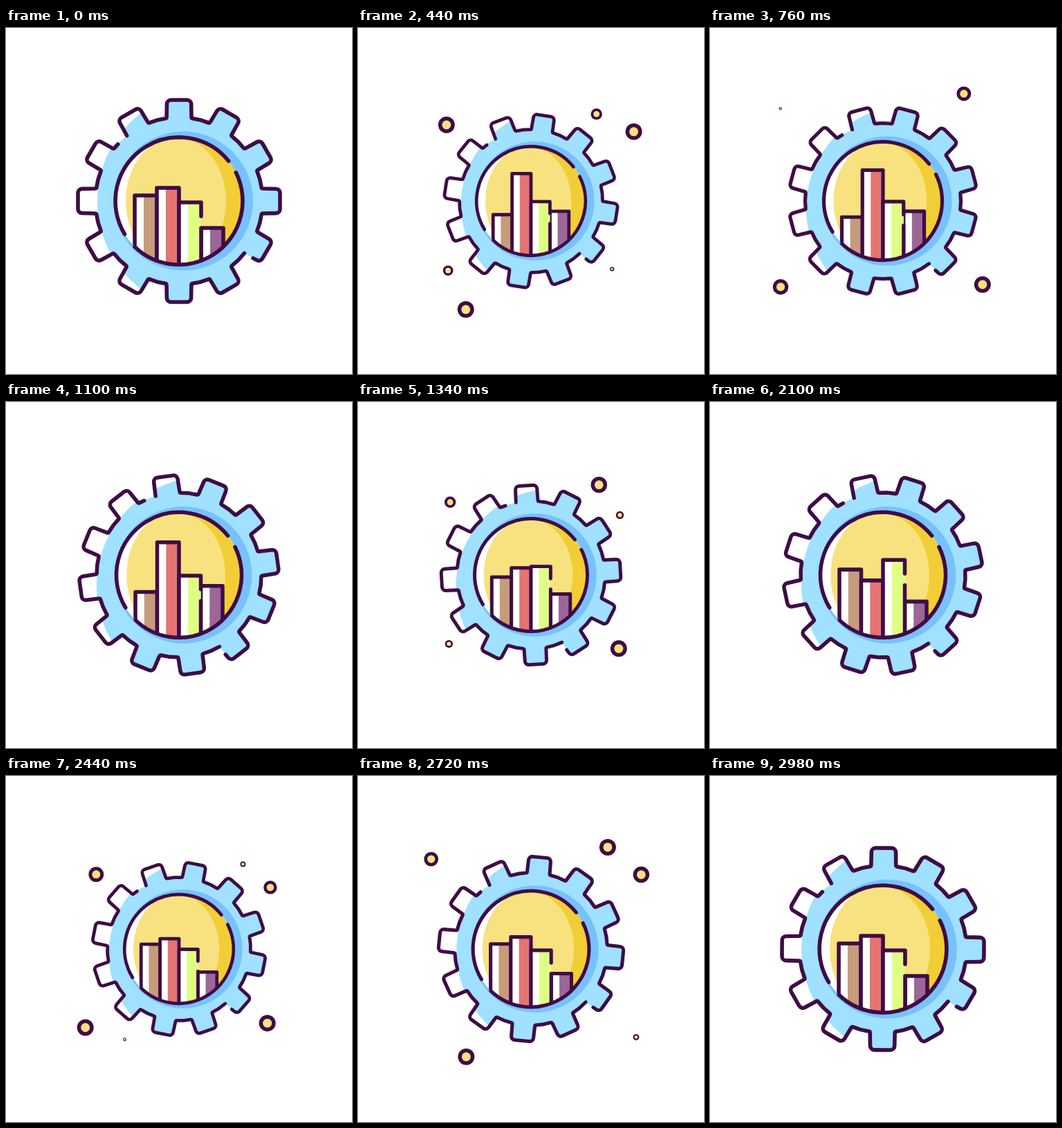
An HTML page with a canvas for the animation above (3000 ms loop, 500 px wide and 500 px high).

```html
<!DOCTYPE html>
<html>
<head>
<meta charset="utf-8">
<style>
html, body { margin: 0; height: 100%; overflow: hidden; background: #fff; }
canvas { display: block; }
</style>
</head>
<body>
<canvas id="stage" width="500" height="500"></canvas>
<script>
const ctx = document.getElementById('stage').getContext('2d');
const LINE = '#3f0c45', BLUE = '#9fe1ff', SHADE = '#79c1fc';
const YELLOW = '#f8e17f', GOLD = '#f1ce35';
const TAU = Math.PI * 2, DEG = TAU / 360, HOLE = 92;

const lerp = (a, b, u) => a + (b - a) * u;
const smooth = (a, b, t) => {
  const u = Math.min(1, Math.max(0, (t - a) / (b - a)));
  return u * u * (3 - 2 * u);
};

// Gear outline around the origin, clockwise from the top tooth
const onTooth = (k, x, y) => {
  const c = Math.cos(k * 30 * DEG), s = Math.sin(k * 30 * DEG);
  return [x * c - y * s, x * s + y * c];
};
const outline = [];
for (let k = 0; k < 12; k++)
  outline.push(
    onTooth(k, -18, -119.5), onTooth(k, -17.5, -146),
    onTooth(k, 17.5, -146), onTooth(k, 18, -119.5),
    onTooth(k + .5, 0, -121));

function rounded(path, pts) {
  pts.forEach(([x, y], i) => {
    if (!i) path.moveTo(x, y);
    else if (i === pts.length - 1) path.lineTo(x, y);
    else path.arcTo(x, y, ...pts[i + 1], Math.hypot(x, y) > 130 ? 6 : 2);
  });
}
const gearFill = new Path2D(), gearLine = new Path2D();
rounded(gearFill, [...outline, outline[0]]);
// the stroke leaves two small gaps
rounded(gearLine, [...outline.slice(55), ...outline.slice(0, 23), onTooth(4, 18, -134)]);
rounded(gearLine, [...outline.slice(23, 54), onTooth(10.43, 0, -120.5)]);

// Bars: tops in each of the three poses
const colors = ['#c69c7b', '#e37472', '#deff84', '#9c6697'];
const poses = [[-8, -19, 2, 39], [25, -48, 1, 16], [-8, 8, -22, 39]];

// Dots: direction in degrees, start time in each cycle
const dots = [
  { angle: 222, starts: [240, 210, 270] },
  { angle: -53, starts: [310, 150, 360] },
  { angle: -34, starts: [120, 240, 290] },
  { angle: 40, starts: [370, 130, 220] },
  { angle: 140, starts: [320, 240, 140] },
  { angle: 121, starts: [90, 340, 380] }
];

function disc(x, y, r, color, rx = r) {
  ctx.fillStyle = color;
  ctx.beginPath();
  ctx.ellipse(x, y, rx, r, 0, 0, TAU);
  ctx.fill();
}

function drawDots(cycle, phase) {
  for (const { angle, starts } of dots) {
    const u = (phase - starts[cycle]) / 600;
    const size = 12 * smooth(0, .35, u) * (1 - smooth(.7, .93, u));
    const far = lerp(151, 202, smooth(0, 1, u));
    const x = 250 + far * Math.cos(angle * DEG), y = 250 + far * Math.sin(angle * DEG);
    disc(x, y, size, LINE);
    disc(x, y, size * .54, YELLOW);
  }
}

function drawGear(angle) {
  ctx.save();
  ctx.rotate(angle);
  ctx.fillStyle = '#fff';
  ctx.fill(gearFill);
  ctx.save();
  ctx.clip(gearFill);
  disc(42, 0, 160, BLUE);
  ctx.restore();
  ctx.stroke(gearLine);
  ctx.restore();
  disc(6.5, 0, 100.5, SHADE);
}

function drawBar(i, top) {
  const left = -64 + 32 * i, right = left + 32;
  ctx.fillStyle = '#fff';
  ctx.fillRect(left, top, 32, 200);
  ctx.fillStyle = colors[i];
  ctx.fillRect(left + 13, top, 19, 200);
  ctx.beginPath();
  ctx.moveTo(left, 120);
  ctx.lineTo(left, top);
  ctx.lineTo(right, top);
  if (i === 2) {
    ctx.lineTo(right, top + 20);
    ctx.moveTo(right, top + 37);
  }
  ctx.lineTo(right, 120);
  ctx.stroke();
}

function drawChart(cycle, phase) {
  const u = smooth(100, 500, phase), next = poses[(cycle + 1) % 3];
  ctx.save();
  ctx.beginPath();
  ctx.arc(0, 0, HOLE, 0, TAU);
  ctx.clip();
  disc(0, 0, HOLE + 2, '#fff');
  ctx.fillStyle = GOLD;
  ctx.fillRect(0, -100, 100, 200);
  disc(-4.5, 0, HOLE, YELLOW, 72.5);
  for (const i of [0, 1, 3, 2])
    drawBar(i, lerp(poses[cycle][i], next[i], u));
  ctx.restore();
  for (const [from, to] of [[-26.6, 134], [148.5, 321.2]]) {
    ctx.beginPath();
    ctx.arc(0, 0, HOLE, from * DEG, to * DEG);
    ctx.stroke();
  }
}

function draw() {
  const t = performance.now() % 3000;
  const cycle = Math.floor(t / 1000), phase = t % 1000;
  const scale = 1 - .15 * smooth(0, 500, Math.min(phase, 1000 - phase));
  const turn = Math.min(t, 3000 - t) / 1500 * 30 * DEG;

  ctx.fillStyle = '#fff';
  ctx.fillRect(0, 0, 500, 500);
  drawDots(cycle, phase);
  ctx.save();
  ctx.translate(250, 250);
  ctx.scale(scale, scale);
  ctx.strokeStyle = LINE;
  ctx.lineWidth = 5.6;
  ctx.lineCap = ctx.lineJoin = 'round';
  drawGear(turn);
  drawChart(cycle, phase);
  ctx.restore();
  requestAnimationFrame(draw);
}
draw();
</script>
</body>
</html>
```
